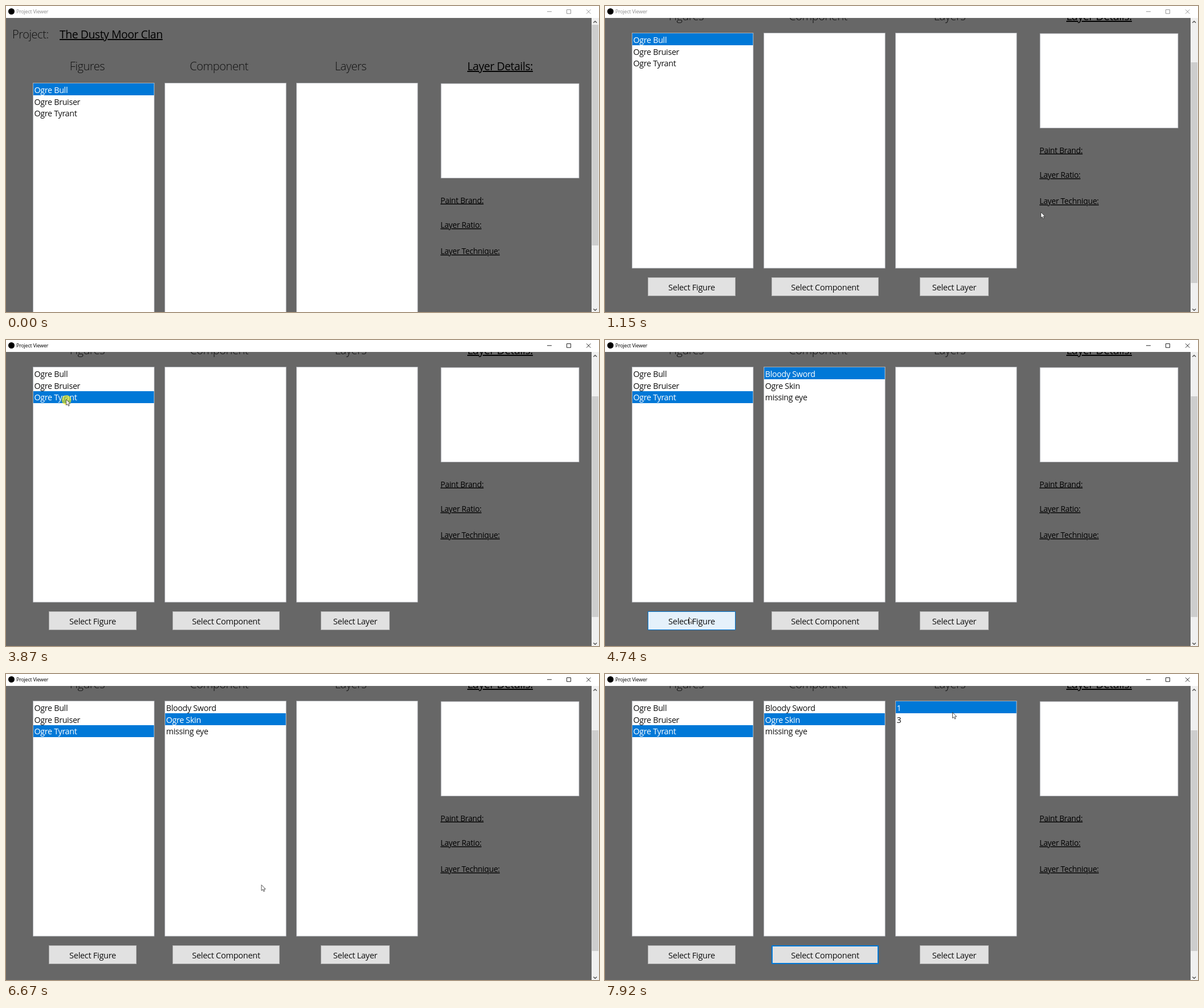
An HTML page for the animation above (7.99 s loop, 1040x538 px).

```html
<!DOCTYPE html>
<html lang="en">
<head>
<meta charset="utf-8">
<title>Project Viewer</title>
<style>
html, body { margin: 0; width: 100%; height: 100%; overflow: hidden; background: #676767; }
svg { display: block; width: 1040px; height: 538px; }
text { font-family: "Open Sans", "Noto Sans", sans-serif; font-size: 14.6px; letter-spacing: -0.022em; fill: #111; white-space: pre; }
.row { font-size: 14.3px; }
.head { font-size: 20px; font-weight: 300; }
.big { font-size: 19.35px; fill: #000; }
.label { font-size: 13.85px; fill: #000; }
.under { text-decoration: underline; text-decoration-thickness: 1px; }
.mid { text-anchor: middle; }
.caption { font-size: 8.9px; }
</style>
</head>
<body>
<svg id="stage" viewBox="0 0 1040 538" xmlns="http://www.w3.org/2000/svg">
  <defs><clipPath id="client"><rect y="21" width="1027" height="517"/></clipPath></defs>
  <rect width="1040" height="538" fill="#676767"/>
  <g clip-path="url(#client)"><g id="page"></g></g>
  <rect x="1027" y="21" width="13" height="517" fill="#f0f0f0"/>
  <rect id="thumb" x="1027.5" width="11.5" height="388" fill="#cdcdcd"/>
  <path d="M1030.3 29.6L1033.2 26.7L1036.1 29.6M1030.3 532.4L1033.2 535.3L1036.1 532.4" fill="none" stroke="#505050" stroke-width="1.4"/>
  <rect width="1040" height="21" fill="#fff"/>
  <circle cx="9.5" cy="9.5" r="5.5" fill="#000"/>
  <text id="caption" class="caption" x="18" y="13">Project Viewer</text>
  <path id="controls" d="M949 9.8H957M983.5 6.5H990.5V13.3H983.5ZM1018 6.3L1025.3 13.6M1025.3 6.3L1018 13.6" fill="none" stroke-width=".9"/>
  <circle id="click" r="8.5" fill="#ffee00" opacity=".6"/>
  <path id="cursor" d="M.5 .5V10.6L2.8 8.5L4.4 12.1L6.1 11.4L4.6 7.9H7.7Z" fill="#fff" stroke="#2a2a2a" stroke-width=".8"/>
</svg>
<script>
const LOOP = 7990, SCROLL = 88, ROW = 20.7, TICK = 75;
const BTN_Y = 565, BTN_H = 33;
const $ = id => document.getElementById(id);
const page = $('page');

function set(el, attrs) {
  for (const k in attrs) el.setAttribute(k, attrs[k]);
}
function add(tag, attrs, text) {
  const el = document.createElementNS('http://www.w3.org/2000/svg', tag);
  set(el, attrs);
  if (text) el.textContent = text;
  page.appendChild(el);
  return el;
}
const show = (el, on) => set(el, { visibility: on ? 'visible' : 'hidden' });
const label = (cls, x, y, text) => add('text', { class: cls, x, y }, text);
const panel = (x, y, width, height) =>
  add('rect', { x, y, width, height, fill: '#fff', stroke: '#abadb3', 'stroke-width': .8 });

function makeList(x, title, names) {
  label('head mid', x + 95, 113, title);
  panel(x, 135.5, 212.5, 413.5);
  return names.map((name, i) => {
    const y = Math.round(136.4 + ROW * i), end = Math.round(136.4 + ROW * (i + 1));
    return {
      bar: add('rect', { x: x + .5, y, width: 211.5, height: end - y, fill: '#0078d7' }),
      text: label('row', x + 2, 153 + 20.5 * i, name)
    };
  });
}
function makeButton(x, width, text) {
  const box = add('rect', {});
  label('mid', x + width / 2, 588, text);
  return { x, width, box };
}

label('head', 11, 57, 'Project:');
label('big under', 94, 57, 'The Dusty Moor Clan');
label('big under', 809, 113, 'Layer Details:');
panel(763, 136.3, 242, 166.3);
label('label under', 762, 346.5, 'Paint Brand:');
label('label under', 762, 390, 'Layer Ratio:');
label('label under', 762, 436, 'Layer Technique:');

const figures = makeList(47.5, 'Figures', ['Ogre Bull', 'Ogre Bruiser', 'Ogre Tyrant']);
const parts = makeList(278.7, 'Component', ['Bloody Sword', 'Ogre Skin', 'missing eye']);
const layers = makeList(509.5, 'Layers', ['1', '3']);
const figureBtn = makeButton(75, 154, 'Select Figure');
const partBtn = makeButton(292, 188, 'Select Component');
const layerBtn = makeButton(552, 121, 'Select Layer');

// When the script of the demo reaches each action
const SCROLLED = 1150, PICK_BRUISER = 2620, PICK_TYRANT = 3800, FIGURE_DOWN = 4590,
  FIGURE_UP = 4740, PICK_SKIN = 5900, PART_DOWN = 7130, PART_UP = 7300;

const clicks = [[PICK_BRUISER, 2850], [PICK_TYRANT, 3950], [FIGURE_DOWN, FIGURE_UP],
  [PICK_SKIN, 6130], [PART_DOWN, PART_UP]];

// Pointer travel: start, end, and where it stops
const moves = [
  [300, 600, 764, 362],
  [1610, 2000, 29, 80],
  [2230, 2310, 20, 82],
  [2400, 2620, 123, 82],
  [3000, 3070, 104, 116],
  [3250, 3480, 105, 104],
  [3950, 3950, 106, 108],
  [4120, 4420, 147, 487],
  [4890, 5590, 316, 77],
  [5900, 6130, 314, 79],
  [6360, 6900, 507, 500],
  [6975, 7130, 394, 485],
  [7620, 7850, 627, 95],
  [7920, 7920, 609, 67]
];

function pointer(t) {
  let x = 1044, y = 524;
  if (t < moves[0][0]) return null;
  for (const [start, end, toX, toY] of moves) {
    if (t < start) break;
    const steps = Math.round((end - start) / TICK) + 1;
    const step = Math.floor((t - start) / TICK) + 1;
    const p = 1 - (1 - Math.min(1, step / steps)) ** 1.2;
    x += (toX - x) * p;
    y += (toY - y) * p;
  }
  return [x, y];
}

function drawList(rows, picked, filled) {
  rows.forEach((row, i) => {
    show(row.bar, filled && i === picked);
    show(row.text, filled);
    row.text.style.fill = i === picked ? '#fff' : '#111';
  });
}
function drawButton(btn, at, scroll, pressed, focused) {
  const over = at && at[0] >= btn.x && at[0] <= btn.x + btn.width &&
    at[1] + scroll >= BTN_Y && at[1] + scroll <= BTN_Y + BTN_H;
  const [fill, stroke] = pressed ? ['#cce4f7', '#005499'] :
    over ? ['#e5f1fb', '#0078d7'] : ['#e1e1e1', focused ? '#0078d7' : '#adadad'];
  const w = focused && !over ? 2 : 1;
  set(btn.box, {
    x: btn.x + w / 2, y: BTN_Y + w / 2, width: btn.width - w, height: BTN_H - w,
    fill, stroke, 'stroke-width': w
  });
}

function draw(t) {
  const scroll = t < SCROLLED ? 0 : SCROLL;
  const at = pointer(t);
  const active = t >= PICK_BRUISER;
  const within = (a, b) => t >= a && t < b;

  set(page, { transform: `translate(0 ${-scroll})` });
  set($('thumb'), { y: scroll ? 99 : 33 });
  $('caption').style.fill = active ? '#000' : '#8c8c8c';
  set($('controls'), { stroke: active ? '#111' : '#8c8c8c' });

  drawList(figures, t < PICK_BRUISER ? 0 : t < PICK_TYRANT ? 1 : 2, true);
  drawList(parts, t < PICK_SKIN ? 0 : 1, t >= FIGURE_UP);
  drawList(layers, 0, t >= PART_UP);
  drawButton(figureBtn, at, scroll, within(FIGURE_DOWN, FIGURE_UP), within(FIGURE_DOWN, PICK_SKIN));
  drawButton(partBtn, at, scroll, within(PART_DOWN, PART_UP), t >= PART_DOWN);
  drawButton(layerBtn, at, scroll, false, false);

  show($('cursor'), at);
  show($('click'), clicks.some(([a, b]) => within(a, b)));
  if (at) {
    set($('cursor'), { transform: `translate(${at[0]} ${at[1]})` });
    set($('click'), { cx: at[0] + 1, cy: at[1] + 1.5 });
  }
}

const origin = performance.now();
function tick() {
  draw((performance.now() - origin) % LOOP);
  requestAnimationFrame(tick);
}
draw(0);
tick();
</script>
</body>
</html>
```
